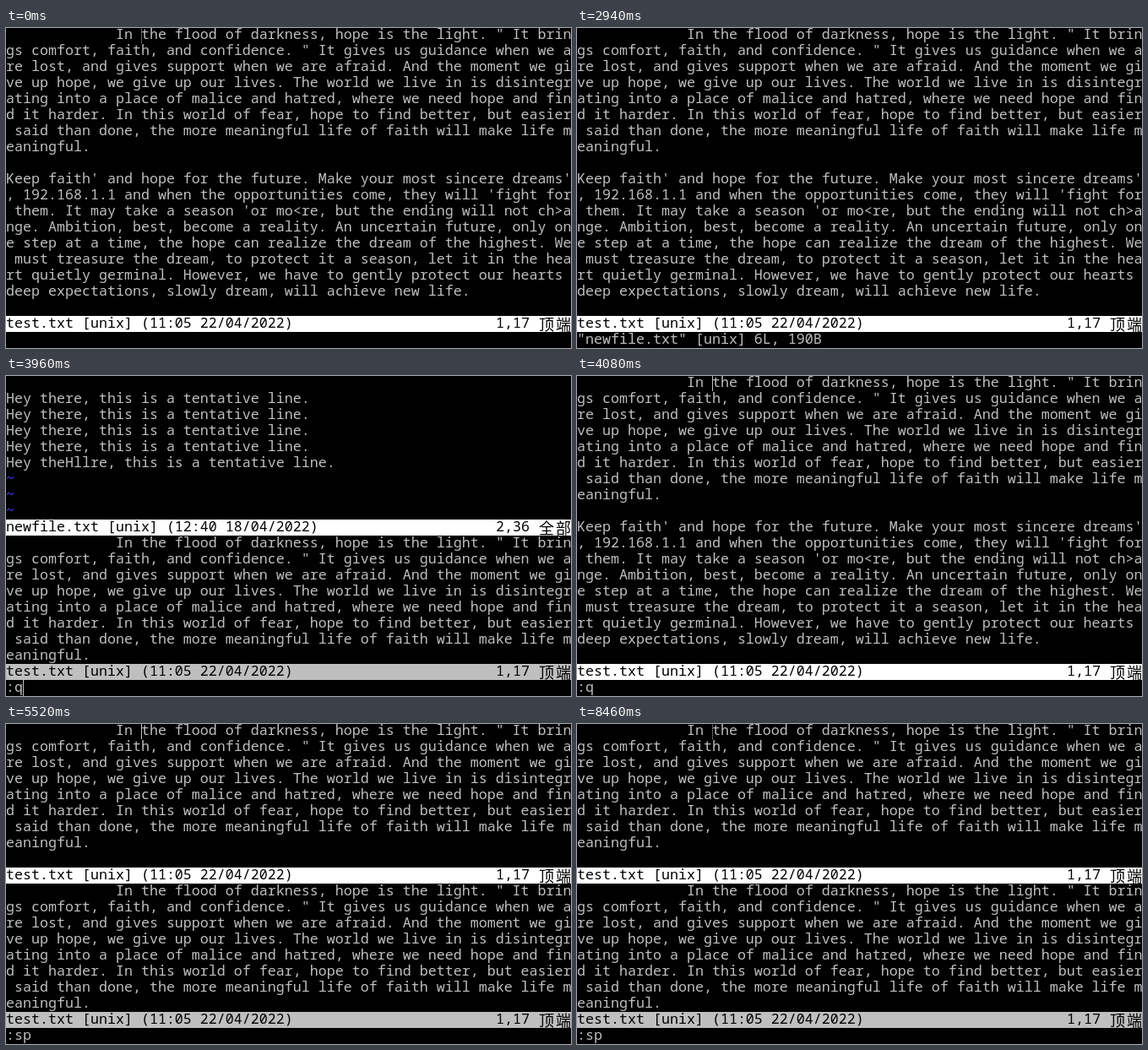
These frames come from a looping animation (669x379 px, 8520 ms). An HTML page:

```html
<!DOCTYPE html>
<html lang="en">
<head>
<meta charset="utf-8">
<title>Split windows</title>
<style>
html, body { margin: 0; width: 100%; height: 100%; overflow: hidden; background: #000; }
svg { display: block; }
text { font: 16.667px "Noto Sans Mono", "DejaVu Sans Mono", monospace; font-variant-ligatures: none; white-space: pre; fill: #bfbfbf; }
.bar { fill: #000; }
.tilde { fill: #4040ff; }
.cjk { font: 300 18px "Noto Sans CJK SC", "Noto Sans CJK", sans-serif; fill: #000; }
</style>
</head>
<body>
<svg id="stage" width="669" height="379" viewBox="0 0 669 379">
  <rect width="669" height="379" fill="#000"/>
</svg>
<script>
(() => {
  const LOOP = 8520, COL = 10, ROW = 19;
  const stage = document.getElementById('stage');

  const essay = [
    ' '.repeat(13) + 'In the flood of darkness, hope is the light. " It brin',
    'gs comfort, faith, and confidence. " It gives us guidance when we a',
    're lost, and gives support when we are afraid. And the moment we gi',
    've up hope, we give up our lives. The world we live in is disintegr',
    'ating into a place of malice and hatred, where we need hope and fin',
    'd it harder. In this world of fear, hope to find better, but easier',
    ' said than done, the more meaningful life of faith will make life m',
    'eaningful.',
    '',
    "Keep faith' and hope for the future. Make your most sincere dreams'",
    ", 192.168.1.1 and when the opportunities come, they will 'fight for",
    " them. It may take a season 'or mo<re, but the ending will not ch>a",
    'nge. Ambition, best, become a reality. An uncertain future, only on',
    'e step at a time, the hope can realize the dream of the highest. We',
    ' must treasure the dream, to protect it a season, let it in the hea',
    'rt quietly germinal. However, we have to gently protect our hearts ',
    'deep expectations, slowly dream, will achieve new life.'
  ];
  const hey = 'Hey there, this is a tentative line.';
  const note = ['', hey, hey, hey, hey, 'Hey theHllre, this is a tentative line.'];

  function add(parent, tag, attrs, content = '') {
    const el = document.createElementNS('http://www.w3.org/2000/svg', tag);
    for (const key in attrs) el.setAttribute(key, attrs[key]);
    el.textContent = content;
    parent.appendChild(el);
    return el;
  }

  const rowTop = row => row * ROW - 1;

  function write(parent, row, str, cls = '', col = 0) {
    return add(parent, 'text', { x: col * COL, y: rowTop(row) + 14, class: cls }, str);
  }

  function statusBar(parent, row, title, pos, extent, color) {
    add(parent, 'rect', { x: 0, y: rowTop(row), width: 669, height: ROW, fill: color });
    write(parent, row, title, 'bar');
    write(parent, row, pos, 'bar', 58);
    [...extent].forEach((ch, i) =>
      add(parent, 'text', { x: 631 + 20 * i, y: rowTop(row) + 16.5, class: 'cjk' }, ch));
  }

  function essayPane(parent, row, height, color) {
    essay.slice(0, height).forEach((line, i) => write(parent, row + i, line));
    statusBar(parent, row + height, 'test.txt [unix] (11:05 22/04/2022)', '1,17', '顶端', color);
  }

  function notePane(parent, row, height, color) {
    for (let i = 0; i < height; i++) {
      if (i < note.length) write(parent, row + i, note[i]);
      else write(parent, row + i, '~', 'tilde');
    }
    statusBar(parent, row + height, 'newfile.txt [unix] (12:40 18/04/2022)', '2,36', '全部', color);
  }

  const views = {};
  for (const name of ['full', 'note', 'twin']) views[name] = add(stage, 'g', {});
  const active = '#fff', inactive = '#bfbfbf';
  essayPane(views.full, 0, 18, active);
  notePane(views.note, 0, 9, active);
  essayPane(views.note, 10, 8, inactive);
  essayPane(views.twin, 0, 9, active);
  essayPane(views.twin, 10, 8, inactive);

  const prompt = write(stage, 19, '');
  const caret = add(stage, 'line', { stroke: '#bfbfbf', 'stroke-width': 1, 'shape-rendering': 'crispEdges' });

  // Each step: start time, view, command line, caret cell [col, row] or null, dotted caret
  const steps = [];
  const step = (time, view, cmd, cell, dotted = false) => steps.push({ time, view, cmd, cell, dotted });
  const type = (view, str, times) => times.forEach((time, i) =>
    step(time, view, str.slice(0, i + 1), [i + 1, 19]));
  const home = [16, 0];
  const info = '"newfile.txt" [unix] 6L, 190B';

  step(0, 'full', '', home, true);
  step(180, 'full', '', home);
  type('full', ':sp newfile.txt',
    [720, 840, 1020, 1320, 1500, 1560, 1740, 1860, 1920, 2100, 2160, 2280, 2340, 2520, 2700]);
  step(2880, 'full', '"newfile.txt"', null);
  step(2940, 'full', info, null);
  step(3000, 'note', info, [35, 1]);
  step(3480, 'note', info, null);
  type('note', ':q', [3720, 3960]);
  step(4080, 'full', ':q', home);
  step(4620, 'full', ':q', null);
  type('full', ':sp', [4920, 5100, 5220]);
  [5520, 6060, 6540, 7020, 7560, 8100].forEach((time, i) =>
    step(time, 'twin', ':sp', i % 2 ? null : home));
  step(8460, 'twin', ':sp', home, true);

  let shown = null;
  function draw(ms) {
    const t = ms % LOOP;
    const now = steps.filter(s => s.time <= t).pop();
    if (now === shown) return;
    shown = now;
    for (const name in views) views[name].style.display = name === now.view ? '' : 'none';
    prompt.textContent = now.cmd;
    caret.style.display = now.cell ? '' : 'none';
    if (!now.cell) return;
    const [col, row] = now.cell;
    const x = col * COL + 0.5, y = rowTop(row);
    caret.setAttribute('x1', x);
    caret.setAttribute('x2', x);
    caret.setAttribute('y1', y);
    caret.setAttribute('y2', y + ROW);
    caret.setAttribute('stroke-dasharray', now.dotted ? '1 1' : 'none');
  }

  const start = performance.now();
  function tick() {
    draw(performance.now() - start);
    requestAnimationFrame(tick);
  }
  draw(0);
  requestAnimationFrame(tick);
})();
</script>
</body>
</html>
```
